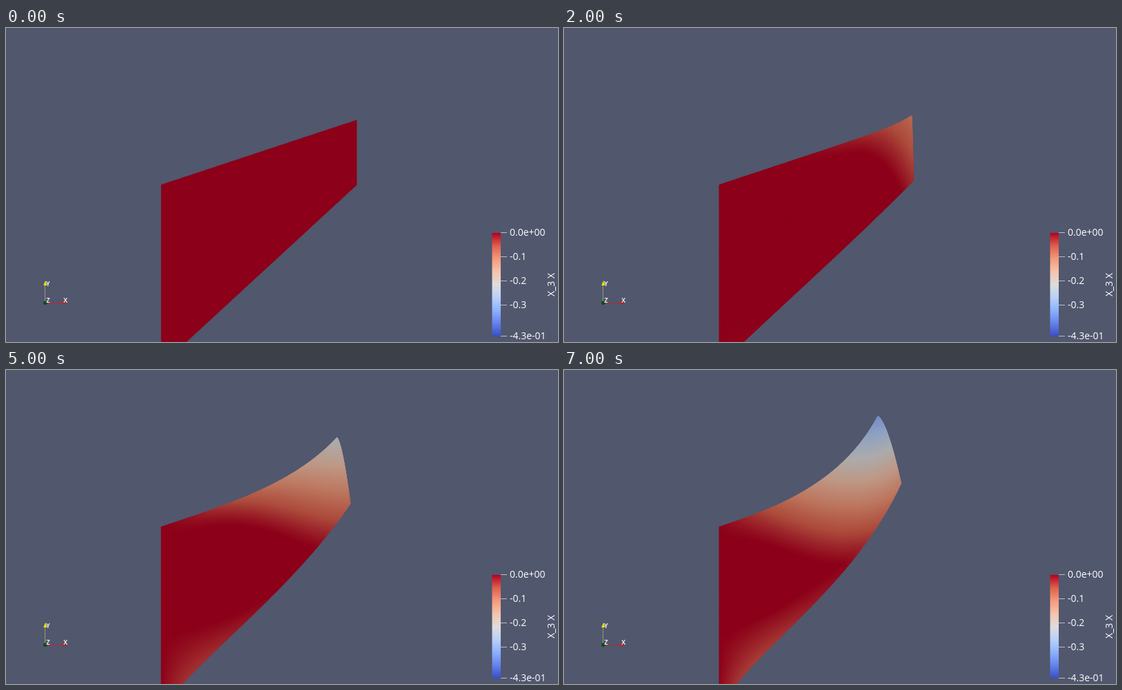
An HTML page with a canvas for the animation above (8 s loop, 800x455 px).

```html
<!DOCTYPE html>
<html lang="en">
<head>
<meta charset="utf-8">
<title>Plate deflection</title>
<style>
  html, body { margin: 0; width: 100%; height: 100%; overflow: hidden; background: #51576d; }
  canvas, svg { position: absolute; left: 0; top: 0; width: 800px; height: 455px; }
  text { font-family: "Open Sans", Arial, sans-serif; fill: #fff; }
  .label { font-size: 14px; }
  .axis { font-size: 9.5px; font-weight: 600; }
</style>
</head>
<body>
<canvas id="view" width="800" height="455"></canvas>
<svg viewBox="0 0 800 455">
  <g fill="none">
    <path d="M56.5 398V372" stroke="#a09878"/>
    <path d="M57 398.5H83" stroke="#b02a3a"/>
  </g>
  <path d="M57 366L59.7 373H54.3Z" fill="#e6e600"/>
  <path d="M88.5 398.3L82 400.9V395.7Z" fill="#cc1c1c"/>
  <circle cx="57" cy="398.3" r="2.8" fill="#0a4d14"/>
  <text class="axis" x="58" y="373.5">Y</text>
  <text class="axis" x="58.3" y="398">Z</text>
  <text class="axis" x="83.2" y="398">X</text>
  <path d="M717 296.5h9M717 331.5h9M717 366.5h9M717 401.5h9M717 446.5h9" stroke="#b9bcc6"/>
  <g class="label">
    <text x="730" y="301">0.0e+00</text>
    <text x="730" y="336">-0.1</text>
    <text x="730" y="371">-0.2</text>
    <text x="730" y="406">-0.3</text>
    <text x="730" y="451">-4.3e-01</text>
    <text transform="translate(795 389) rotate(-90)">X_3 X</text>
  </g>
</svg>
<script>
const ctx = document.getElementById('view').getContext('2d');
const STEP = 1000, STEPS = 8, COLS = 100, ROWS = 64, LIGHT = 0.775;

// Diverging colour scale, from zero to the most negative value
const SCALE = [
  [180, 0, 32], [222, 96, 77], [244, 154, 123], [245, 196, 173], [221, 221, 221],
  [184, 208, 249], [141, 176, 254], [98, 130, 234], [59, 76, 192]
];

// Corner travel and strength of the lower bulge at each step
const TIP_X = [0, 1.3, 4.5, 9.5, 18.5, 29, 39.5, 54];
const TIP_Y = [0, 2, 6.5, 13, 22.5, 35.5, 49, 66.5];
const LOW_X = [0, 0.4, 1.5, 3, 5.5, 9, 13, 19.5];
const BULGE = [0, 0.005, 0.02, 0.05, 0.1, 0.12, 0.13, 0.13];

const mix = (a, b, k) => a + (b - a) * k;
const hump = p => p * (1 - p) ** 2 / 0.148;

function color(f, light) {
  const s = Math.min(Math.max(f, 0), 1) * (SCALE.length - 1);
  const i = Math.min(Math.floor(s), SCALE.length - 2);
  const rgb = SCALE[i].map((c, j) => Math.round(mix(c, SCALE[i + 1][j], s - i) * light));
  return `rgb(${rgb})`;
}

// p runs from the clamped edge to the free one, v from top to bottom
function place(t, p, v) {
  const top = t ? p ** (2 + 30 / (t * t)) : 0, low = p ** 3.3;
  const dx = mix(TIP_X[t] * top, LOW_X[t] * low + 0.36 * t * t * hump(p), v ** 0.63);
  const dy = TIP_Y[t] * mix(top, 0.95 * low, v);
  return [224.7 + 283.8 * p - dx, 227 - 94 * p + (262 - 167.5 * p) * v - dy];
}

// Bending spreads down from the top edge, the bulge up from the bottom one
function field(t, p, v) {
  if (!t) return 0;
  const top = 0.104 * t * p ** (1 + 11 / (t * t));
  const depth = 0.09 + 1.7 * p ** (21 / t - 1.2);
  const start = 0.6 + 3.2 / t * p;
  return top * Math.max(0, 1 - v / depth) ** 1.2
    + BULGE[t] * hump(p) * Math.max(0, v - start) / 0.34;
}

function trace(points) {
  ctx.beginPath();
  points.forEach(q => ctx.lineTo(q[0], q[1]));
  ctx.closePath();
}

function outline(t) {
  const pts = [], N = 120;
  for (let i = 0; i <= N; i++) pts.push(place(t, i / N, 0));
  for (let i = 1; i <= N; i++) pts.push(place(t, 1, (i / N) ** 2));
  for (let i = N; i >= 0; i--) pts.push(place(t, i / N, 1));
  return pts;
}

function drawPlate(t) {
  ctx.save();
  trace(outline(t));
  ctx.fillStyle = color(0, LIGHT);
  if (!t) ctx.fill();
  else {
    ctx.clip();
    ctx.lineWidth = 1.5;
    for (let i = 0; i < COLS; i++) {
      for (let j = 0; j < ROWS; j++) {
        const p = i / COLS, q = (i + 1) / COLS;
        const v = (j / ROWS) ** 1.3, w = ((j + 1) / ROWS) ** 1.3;
        trace([place(t, p, v), place(t, q, v), place(t, q, w), place(t, p, w)]);
        ctx.fillStyle = ctx.strokeStyle = color(field(t, (p + q) / 2, (v + w) / 2), LIGHT);
        ctx.fill();
        ctx.stroke();
      }
    }
  }
  ctx.restore();
}

function drawBar() {
  const g = ctx.createLinearGradient(0, 297, 0, 447);
  SCALE.forEach((c, i) => g.addColorStop(i / (SCALE.length - 1), `rgb(${c})`));
  ctx.fillStyle = g;
  ctx.fillRect(704.5, 297, 12.5, 150);
}

let shown = -1;
function frame() {
  const t = Math.floor(performance.now() / STEP) % STEPS;
  if (t !== shown) {
    shown = t;
    ctx.fillStyle = '#51576d';
    ctx.fillRect(0, 0, 800, 455);
    drawPlate(t);
    drawBar();
  }
  requestAnimationFrame(frame);
}
frame();
</script>
</body>
</html>
```
